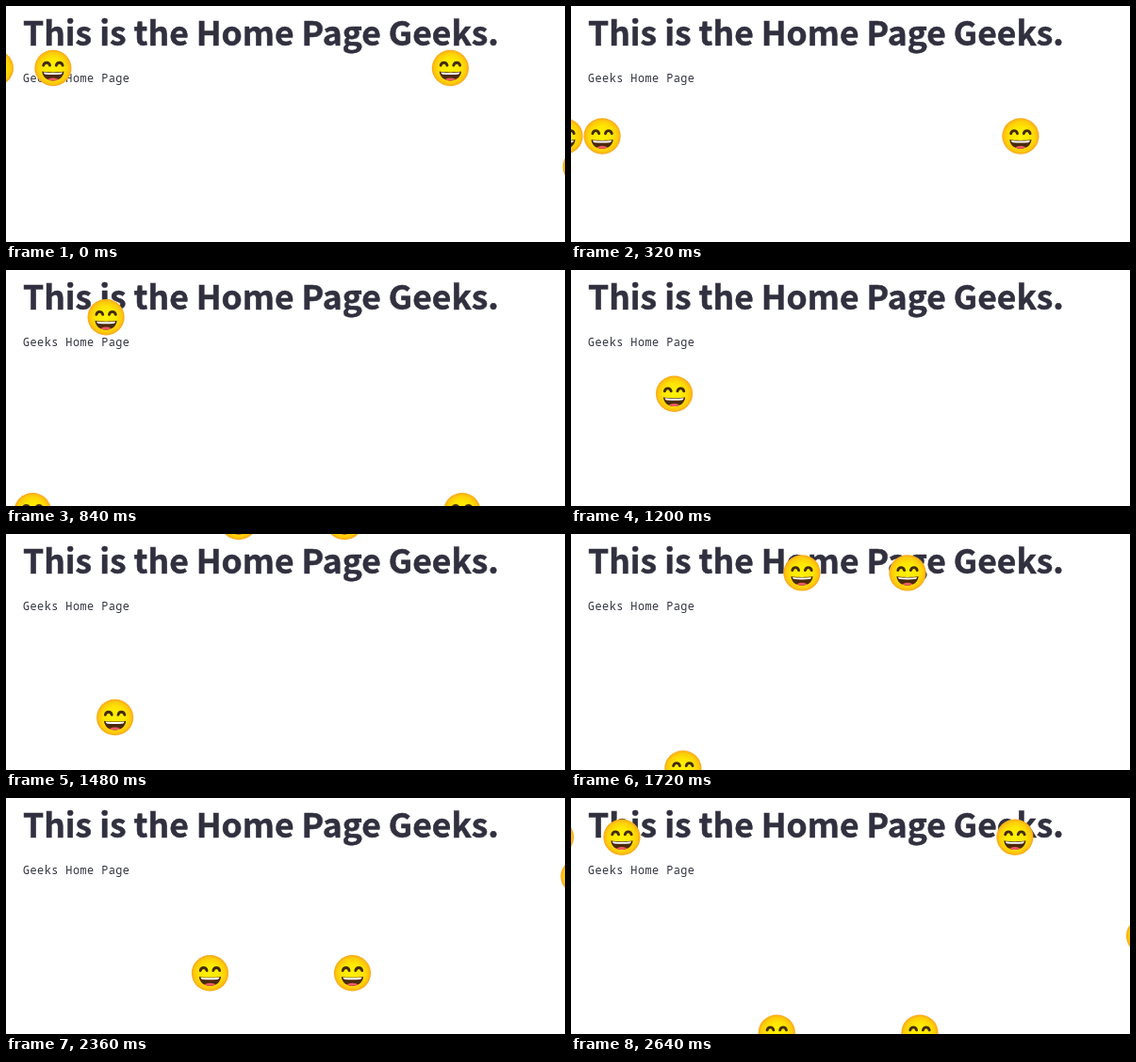
An HTML page for the animation above (2.66 s loop, 593x251 px).

```html
<!DOCTYPE html>
<html lang="en">
<head>
<meta charset="utf-8">
<title>Home Page</title>
<style>
  html, body { margin: 0; width: 100%; height: 100%; overflow: hidden; background: #fff; }
  svg { display: block; }
  text { fill: #31333f; white-space: pre; }
  .title {
    font: 700 35.45px "Noto Sans CJK JP", "Noto Sans CJK SC", "Noto Sans", sans-serif;
    fill: #31303f;
    stroke: #31303f;
    stroke-width: .5px;
  }
  .note { font: 11.8px "Noto Sans Mono", monospace; letter-spacing: .48px; }
</style>
</head>
<body>
<svg width="593" height="251" viewBox="0 0 593 251">
  <defs>
    <radialGradient id="skin">
      <stop offset="0" stop-color="#fff200"/>
      <stop offset=".55" stop-color="#ffe600"/>
      <stop offset=".85" stop-color="#fecb0a"/>
      <stop offset="1" stop-color="#f9a61e"/>
    </radialGradient>
    <clipPath id="lips">
      <path d="M-11.6 3.6C-6 4.8 6 4.8 11.6 3.6C11.2 9.6 6.5 13.4 0 13.4S-11.2 9.6-11.6 3.6Z"/>
    </clipPath>
    <g id="face">
      <ellipse rx="19.6" ry="19.2" fill="url(#skin)"/>
      <g fill="none" stroke="#422b0d" stroke-width="2.9" stroke-linecap="round">
        <path d="M-10.2-2.8C-9.2-6.8-4.4-6.8-3.4-2.8"/>
        <path d="M3.4-2.8C4.4-6.8 9.2-6.8 10.2-2.8"/>
      </g>
      <g clip-path="url(#lips)">
        <rect x="-14" y="2" width="28" height="14" fill="#4a2a0c"/>
        <path d="M-10 4.5Q0 5.6 10 4.5Q9.8 6.5 8 6.7Q0 7.4-8 6.7Q-9.8 6.5-10 4.5Z" fill="#fff"/>
        <ellipse cy="13.4" rx="6.2" ry="3" fill="#ee5a62"/>
      </g>
    </g>
  </defs>
  <text class="title" x="18" y="42">This is the Home Page Geeks.</text>
  <text class="note" x="18" y="81">Geeks Home Page</text>
  <g id="rain"></g>
</svg>
<script>
  const LOOP = 2660, STEP = 40;
  const SPEED = .2264;      // px per ms
  const CYCLE = 622;        // px from one fall to the next
  const HALF_SWAY = 205;    // px fallen between the two ends of a sway
  const WIDE = 16, NARROW = 6.5;

  // x: middle of the sway, peak: height where it is furthest right, start: fall offset
  const drops = [
    { x: -22.4, sway: WIDE, peak: 120, start: 556 },
    { x: 40.4, sway: WIDE, peak: 5, start: 556 },
    { x: 477.4, sway: NARROW, peak: 246, start: 556 },
    { x: 112.5, sway: NARROW, peak: 265, start: 140 },
    { x: 231.4, sway: WIDE, peak: 5, start: 348 },
    { x: 363.5, sway: NARROW, peak: 246, start: 348 },
    { x: 614, sway: NARROW, peak: 315, start: 451 }
  ];

  const rain = document.getElementById("rain");
  for (const drop of drops) {
    drop.node = document.createElementNS(rain.namespaceURI, "use");
    drop.node.setAttribute("href", "#face");
    rain.append(drop.node);
  }

  function draw(now) {
    const t = Math.floor(now % LOOP / STEP) * STEP;
    for (const { node, x, sway, peak, start } of drops) {
      const y = (SPEED * t - start + 40 + CYCLE) % CYCLE - 40;
      const drift = sway * Math.cos(Math.PI * (y - peak) / HALF_SWAY);
      node.setAttribute("transform", `translate(${x + drift} ${y})`);
    }
  }

  const begin = performance.now();
  function tick() {
    draw(performance.now() - begin);
    requestAnimationFrame(tick);
  }
  tick();
</script>
</body>
</html>
```
